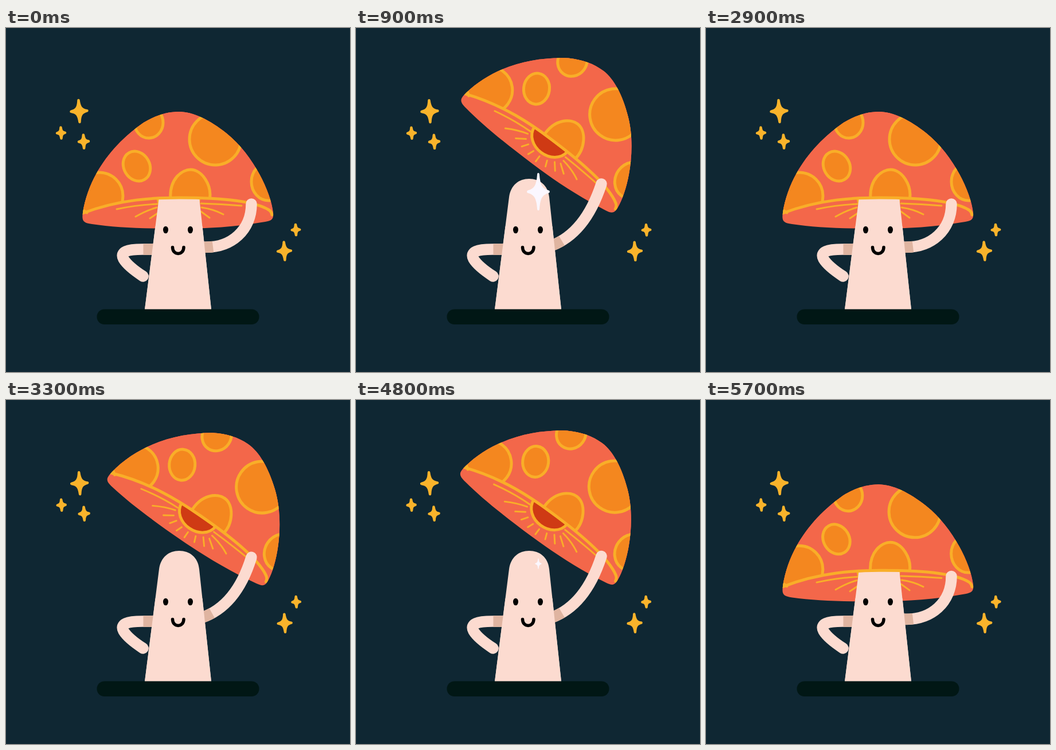
Animation, 600 px wide and 600 px high, one loop 5800 ms. Source, as an HTML page:

```html
<!DOCTYPE html>
<html lang="en">
<head>
<meta charset="utf-8">
<title>Mushroom tipping its cap</title>
<style>
html, body { margin: 0; height: 100%; overflow: hidden; background: #0f2733; }
svg { display: block; width: 100%; height: 100%; }
.line { fill: none; stroke: #f9ae28; stroke-width: 5; stroke-linecap: round; }
.gill { stroke-width: 2.9; }
.spot { fill: #f4871f; stroke: #f9ae28; stroke-width: 5; }
.arm { fill: none; stroke: #fcdbd0; stroke-width: 19.5; stroke-linecap: round; }
.shade { stroke: #dfb4a0; stroke-linecap: butt; }
.skin { fill: #fcdbd0; }
.star { fill: #f9b32b; stroke: #f9b32b; stroke-linejoin: round; }
</style>
</head>
<body>
<svg viewBox="0 0 600 600">
  <defs>
    <path id="star" d="M0-19C1-7 4-2 14 0C4 2 1 7 0 19C-1 7-4 2-14 0C-4-2-1-7 0-19Z"/>
    <path id="dome" d="M134 322C145 252 192 198 240 165C262 152 281 146 302 146C326 146 355 160 385 184C430 220 462 285 466 324C430 300 360 296 302 296C260 296 200 298 134 322Z"/>
    <path id="outline" d="M134 322C145 252 192 198 240 165C262 152 281 146 302 146C326 146 355 160 385 184C430 220 462 285 466 322C467 333 464 336 452 338C400 347 350 350 300 350C240 350 190 348 150 342C134 340 132 336 134 322Z"/>
    <clipPath id="inDome"><use href="#dome"/></clipPath>
    <clipPath id="inCap"><use href="#outline"/></clipPath>
  </defs>

  <g id="stars" class="star"></g>

  <g class="cap">
    <use href="#outline" fill="#f3674a"/>
    <path class="line gill" d="M193 316Q230 308 264 307M226 329Q245 318 263 313M251 332L266 322M268 337L275 327M285 341L289 331M303 343V332M322 340L318 330M340 336L330 324M411 310Q375 307 340 306M379 325Q362 316 341 313M355 331L340 320"/>
    <path d="M265 296C266 314 283 325 301 325C319 325 336 314 337 296Z" fill="#cf3a14" stroke="#f9ae28" stroke-width="5"/>
  </g>

  <path class="skin" d="M242 491L267 295C270 274 284 263 302 263C320 263 335 274 337 295L358 491Z"/>

  <g class="cap">
    <use href="#dome" fill="#f3674a"/>
    <g class="spot" clip-path="url(#inDome)">
      <circle cx="365" cy="194" r="45"/>
      <ellipse cx="249" cy="165" rx="25" ry="27"/>
      <ellipse cx="228" cy="241" rx="22.500" ry="27" transform="rotate(-30 228 241)"/>
      <circle cx="163" cy="293" r="41"/>
      <path d="M287 300C284 262 308 247 322 247C342 247 360 275 355 300Z"/>
      <ellipse cx="458" cy="268" rx="30" ry="33"/>
    </g>
    <path class="line" clip-path="url(#inCap)" d="M133 317L141 322M134 323C200 298 260 296 302 296C360 296 430 300 458 317Q463 320 464 326"/>
  </g>

  <path class="arm" id="arm"/>
  <path class="arm shade" id="armShade" stroke-dasharray="21 999"/>
  <path class="arm" d="M258 386H238C212 386 198 390 205 403Q213 416 239 433"/>
  <path class="arm shade" d="M258 386H239.500"/>
  <path class="skin" d="M260.500 346H342.600L358 491H242Z"/>

  <ellipse cx="278.500" cy="352" rx="4.500" ry="6.300"/>
  <ellipse cx="321.500" cy="352" rx="4.500" ry="6.300"/>
  <path d="M290.500 382.500C290.500 397 310 397 310 382.500" fill="none" stroke="#000" stroke-width="5.500" stroke-linecap="round"/>
  <rect x="158.500" y="490.500" width="283" height="26.500" rx="13" fill="#011715"/>
  <use id="glint" href="#star" fill="#fbf7ff" stroke="#fbf7ff" stroke-width="3" stroke-linejoin="round"/>
</svg>
<script>
const CYCLE = 2900, STEP = 100;
const $ = id => document.getElementById(id);
const caps = document.querySelectorAll('.cap');

// x, y, scale
$('stars').innerHTML = [
  [127.5, 145, 1], [96, 183, .5], [135.5, 198, .61], [485.5, 389, .82], [505.5, 352, .48]
].map(([x, y, s]) => `<use href="#star" stroke-width="${4.5 / s}"
  transform="translate(${x} ${y}) rotate(-3) scale(${s})"/>`).join('');

const clamp = v => Math.max(0, Math.min(1, v));
const mix = (a, b, p) => a + (b - a) * p;
const quad = p => p < .5 ? 2 * p * p : 1 - 2 * (1 - p) ** 2;
const sine = p => (1 - Math.cos(Math.PI * p)) / 2;

// 0 = cap on the head, 1 = cap raised
function lift(t) {
  if (t < 500) return mix(0, 1.015, quad(t / 500));
  if (t < 1850) return mix(1.015, 1, clamp((t - 500) / 400));
  if (t < 2450) return mix(1, -.08, quad((t - 1850) / 600));
  return mix(-.08, 0, sine(clamp((t - 2500) / 400)));
}

// raised and resting arm share one cubic
const restArm = [340, 382, 395, 386, 428, 350, 428, 307];
const highArm = [340, 380, 384, 364, 411, 324, 428, 272];

function draw(t) {
  const k = lift(t);
  for (const cap of caps) cap.setAttribute('transform',
    `translate(${428 + 7 * k} ${307 - 28 * k}) rotate(${37 * k}) translate(-428 -307)`);

  const [x, y, ...curve] = restArm.map((v, i) => mix(v, highArm[i], k));
  for (const id of ['arm', 'armShade']) $(id).setAttribute('d', `M${x} ${y}C${curve}`);

  const size = Math.min(clamp((t - 600) / 300), clamp((2100 - t) / 700));
  $('glint').setAttribute('transform', `translate(318 285.500) scale(${1.28 * size} ${1.6 * size})`);
  $('glint').style.display = size ? '' : 'none';

  const sway = .5 - .5 * Math.cos(t / CYCLE * 10 * Math.PI);
  $('stars').setAttribute('transform', `translate(${sway} ${sway * .3})`);
}

const start = performance.now();
function frame() {
  const t = Math.max(0, performance.now() - start);
  draw(Math.floor(t / STEP) * STEP % CYCLE);
  requestAnimationFrame(frame);
}
frame();
</script>
</body>
</html>
```
